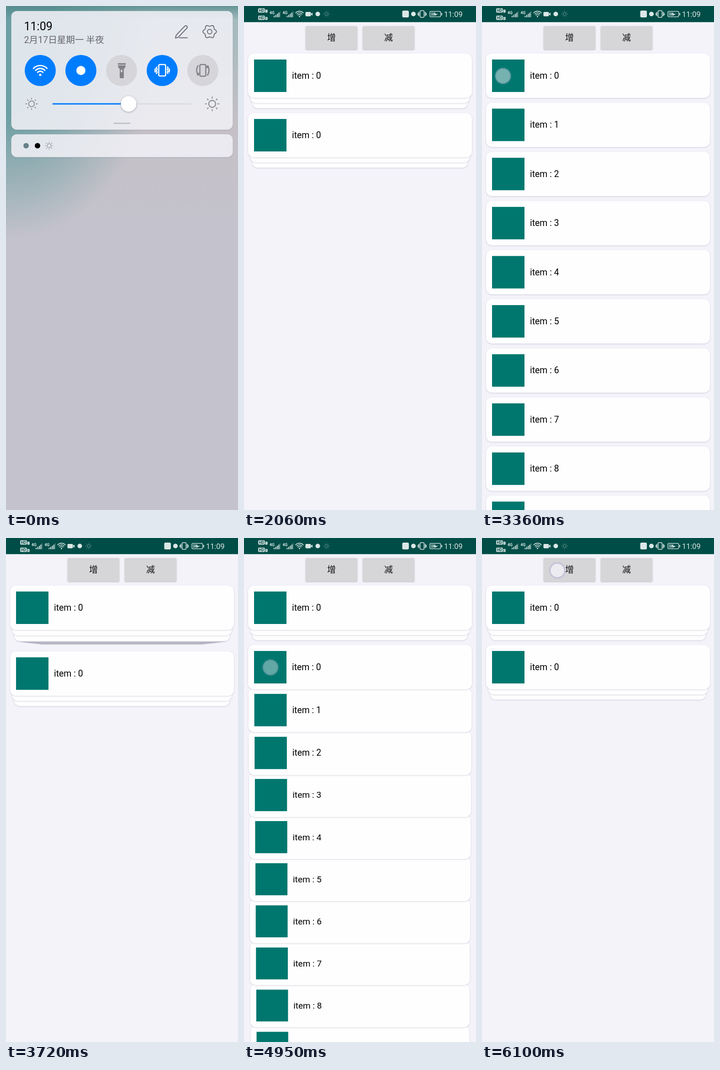
An HTML page that plays this animation: 508 px wide and 1102 px high, repeating every 6.14 s.

```html
<!DOCTYPE html>
<html lang="zh">
<head>
<meta charset="utf-8">
<style>
  html, body { margin: 0; width: 100%; height: 100%; overflow: hidden; }
  #stage {
    position: relative; width: 508px; height: 1102px; overflow: hidden; background: #f4f3fa;
    font-family: Roboto, "Noto Sans CJK SC", "Noto Sans CJK", sans-serif;
  }
  #stage > *, #list > *, .card > * { position: absolute; }
  svg { left: 0; top: 0; font-family: inherit; }
  .button {
    top: 43.5px; width: 113px; height: 51px; border-radius: 2px; background: #d6d5d8;
    box-shadow: 0 1px 3px rgba(0, 0, 0, .25); color: #111;
    font-size: 19px; font-weight: 500; line-height: 52px; text-align: center;
  }
  .card {
    left: 9px; top: 0; width: 490px; height: 97px; border-radius: 13px; background: #fefeff;
    box-shadow: 0 1px 3px rgba(50, 50, 90, .2); transform-origin: 50% 100%;
  }
  .icon { left: 13px; top: 13px; width: 71px; height: 71px; background: #00776e; }
  .label { left: 96px; top: 0; line-height: 98px; font-size: 19.4px; color: #000; white-space: pre; }
  #touch {
    left: -17px; top: -17px; width: 30px; height: 30px; border-radius: 50%;
    border: 2px solid rgba(180, 180, 212, .85); background: rgba(240, 239, 246, .82);
    box-shadow: 0 0 4px rgba(190, 190, 215, .6);
  }
  #shade {
    inset: 0;
    background:
      linear-gradient(#4d8484b0, #4d848400 30px),
      radial-gradient(ellipse 330px 420px at 0 90px, #6b9fa3 35%, #6b9fa300),
      linear-gradient(#9eb9bd, #c5c0c6 260px, #c4c2cc 470px);
  }
</style>
</head>
<body>
<div id="stage">
  <div class="button" style="left:135px">增</div>
  <div class="button" style="left:260px">减</div>
  <div id="list"></div>

  <svg width="508" height="36">
    <defs>
      <g id="sun" fill="none" stroke="currentColor" stroke-width="1.8" stroke-linecap="round">
        <circle r="6.3"/>
        <path d="M0-10.5V-12.5M0 10.5V12.5M-10.5 0H-12.5M10.5 0H12.5M-7.4-7.4-8.8-8.8M7.4 7.4 8.8 8.8M7.4-7.4 8.8-8.8M-7.4 7.4-8.8 8.8"/>
      </g>
      <g id="wifi" fill="none" stroke="currentColor" stroke-width="2.8" stroke-linecap="round">
        <circle r="2.6" fill="currentColor" stroke="none"/>
        <path d="M-5.8-5.5A8 8 0 0 1 5.8-5.5M-10.1-9.7A14 14 0 0 1 10.1-9.7M-14.8-14.1A20.5 20.5 0 0 1 14.8-14.1"/>
      </g>
      <g id="vibrate" fill="none" stroke="currentColor" stroke-width="2.6" stroke-linejoin="round">
        <rect x="-7.5" y="-12.5" width="15" height="25" rx="2.5"/>
        <path d="M-11-8-13-5-11-2-13 1-11 4-13 8M11-8 13-5 11-2 13 1 11 4 13 8M-15-4-16 0-15 5M15-4 16 0 15 5"/>
      </g>
      <g id="hd">
        <rect width="14.5" height="9.5" rx="2"/>
        <rect x="15.5" y="3" width="5" height="6.5" rx="1"/>
        <text x="7.2" y="7.8" font-size="8.5" font-weight="700" text-anchor="middle" fill="#004d47">HD</text>
      </g>
      <g id="signal">
        <text y="18" font-size="8.5" font-weight="700" textLength="auto">4G</text>
        <path d="M9 24.5v-3h2v3zM12.5 24.5v-5h2v5zM16 24.5v-7.5h2v7.5zM19.3 24.5v-10h2v10z"/>
        <path d="M22.3 24.5v-13h1.2v13z" opacity=".5"/>
      </g>
    </defs>
    <rect width="508" height="35.3" fill="#004d47"/>
    <g fill="#dbe7e6" color="#dbe7e6">
      <use href="#hd" x="31" y="5"/>
      <use href="#hd" x="31" y="21"/>
      <text x="48.5" y="13.2" font-size="6" fill="#004d47" text-anchor="middle">1</text>
      <text x="48.5" y="29.2" font-size="6" fill="#004d47" text-anchor="middle">2</text>
      <use href="#signal" x="56"/>
      <use href="#signal" x="84.5"/>
      <use href="#wifi" transform="translate(121.5 23) scale(.57)"/>
      <path d="M136.500 13h8q2 0 2 2v5.500q0 2-2 2h-8q-2 0-2-2v-5.500q0-2 2-2zM147 16.500l3-2v6.500l-3-2z"/>
      <circle cx="161.500" cy="17.500" r="5"/>
      <use href="#sun" transform="translate(181 17.500) scale(.53)" opacity=".55"/>
      <rect x="346.500" y="10" width="14.500" height="15" rx="3"/>
      <circle cx="371" cy="17.500" r="5"/>
      <use href="#vibrate" transform="translate(390 17.500) scale(.58)"/>
      <rect x="407" y="11.700" width="23.500" height="12" rx="2.500" fill="none" stroke="currentColor" stroke-width="1.300"/>
      <path d="M409 13.700h10v8h-10z" opacity=".45"/>
      <path d="M412 18.500l7-3.500v2.300h6l-7 4v-2.800zM432 15h1.800v5.500H432z"/>
      <text x="438" y="23.700" font-size="16.300">11:09</text>
    </g>
  </svg>

  <div id="touch"></div>
  <div id="shade"></div>

  <svg id="panel" width="508" height="340">
    <g fill="#f5f5fa" fill-opacity=".86" style="filter:drop-shadow(0 1px 1px rgba(60,60,80,.22))">
      <rect x="11.500" y="11" width="485" height="259.500" rx="12"/>
      <rect x="11.500" y="280.500" width="485" height="50" rx="12"/>
    </g>
    <text x="39.500" y="52.500" font-size="25">11:09</text>
    <text x="39.500" y="81" font-size="19.600" fill="#65656b">2月17日星期一 半夜</text>
    <g fill="none" stroke="#707076" stroke-width="2" stroke-linejoin="round" stroke-linecap="round">
      <path d="M371 70l1.500-6 19-20q2.500-2 4.500 0t0 4.500l-19 20zM380 69.500h17"/>
      <path id="gear"/>
      <circle cx="446" cy="56" r="5"/>
    </g>
    <g fill="#007dff">
      <circle cx="75" cy="141" r="34"/><circle cx="164" cy="141" r="34"/><circle cx="342" cy="141" r="34"/>
    </g>
    <g fill="#d6d5da">
      <circle cx="253" cy="141" r="34"/><circle cx="431" cy="141" r="34"/>
    </g>
    <g color="#fff">
      <use href="#wifi" x="75" y="150.500"/>
      <circle cx="164" cy="141" r="10" fill="#fff"/>
      <use href="#vibrate" x="342" y="140.500"/>
    </g>
    <path fill="#818187" d="M245 125h17v3.500h-17zM245 130h17q0 5-4 7.500v18q0 2.500-2.500 2.500h-4q-2.500 0-2.500-2.500v-18q-4-2.500-4-7.500z"/>
    <ellipse cx="253" cy="142" rx="2" ry="3" fill="#d6d5da"/>
    <g fill="none" stroke="#818187" stroke-width="2.500">
      <rect x="424.500" y="128" width="13" height="25.500" rx="2.500"/>
      <path d="M421 130q-7 10 0 22M441 130q7 10 0 22M418 150h3.500v-4M444 132h-3.500v4"/>
    </g>
    <g stroke-width="3" stroke-linecap="round">
      <path d="M103 214H405" stroke="#dcdbe1"/>
      <path d="M103 214H268" stroke="#007dff"/>
      <path d="M237 256.500H271" stroke="#c3c2c8"/>
    </g>
    <circle cx="268.500" cy="214" r="17" fill="#fff" style="filter:drop-shadow(0 1px 2px rgba(0,0,0,.3))"/>
    <g color="#88888d">
      <use href="#sun" x="56" y="214"/>
      <use href="#sun" transform="translate(451.500 214) scale(1.2)"/>
      <use href="#sun" transform="translate(94.500 305.500) scale(.68)"/>
    </g>
    <circle cx="44" cy="305.500" r="6" fill="#65818a"/>
    <circle cx="69" cy="305.500" r="6"/>
  </svg>
</div>

<script>
const LOOP = 6140, COUNT = 15, PITCH = 107.4, STACK_STEP = 11.3, TOP = 104;
const TOGGLE_MS = 275, FADE_MS = 120;
// Start of expanding and of collapsing, per group
const groupTimes = [[2272, 3462], [4275, 4882]];
// x, y, appears, gone
const taps = [
  [45, 153, 2060, 2400], [46, 153, 3050, 3432],
  [57, 283, 4040, 4400], [58, 283, 4670, 5010], [165, 71, 6000, 9000]
];

const byId = id => document.getElementById(id);
const clamp = v => Math.min(1, Math.max(0, v));
const smooth = v => (1 - Math.cos(Math.PI * clamp(v))) / 2;

byId('gear').setAttribute('d', 'M' + Array.from({ length: 48 }, (_, i) => {
  const angle = i / 48 * 2 * Math.PI;
  const radius = 13.2 + 1.7 * Math.cos(6 * angle);
  return [446 + radius * Math.cos(angle), 56 + radius * Math.sin(angle)].map(v => v.toFixed(1));
}).join('L') + 'Z');

const groups = groupTimes.map(() => {
  const cards = Array.from({ length: COUNT }, (_, i) => {
    const card = document.createElement('div');
    card.className = 'card';
    card.innerHTML = `<div class="icon"></div><div class="label">item : ${i}</div>`;
    return card;
  });
  byId('list').append(...[...cards].reverse());
  return cards;
});

function placeGroup(cards, top, open) {
  const folded = 1 - open;
  const slot = i => Math.min(i, 2) * STACK_STEP * folded + i * PITCH * open;
  cards.forEach((card, i) => {
    const lift = .5 * folded * Math.max(0, i - 2);
    const scale = 1 - 9 * i * folded / 490;
    card.style.transform = `translateY(${top + slot(i) - lift}px) scale(${scale})`;
    card.style.visibility = open === 0 && i > 2 ? 'hidden' : 'visible';
  });
  return top + slot(COUNT - 1) + PITCH;
}

function draw(t) {
  let top = TOP;
  groups.forEach((cards, g) => {
    const [expand, collapse] = groupTimes[g];
    const open = smooth((t - expand) / TOGGLE_MS) - smooth((t - collapse) / TOGGLE_MS);
    top = placeGroup(cards, top, open);
  });

  const tap = taps.find(([, , start, end]) => t >= start && t < end);
  const touch = byId('touch').style;
  touch.opacity = tap ? Math.min(clamp((t - tap[2]) / 80), clamp((tap[3] - t) / FADE_MS)) : 0;
  if (tap) touch.transform = `translate(${tap[0]}px, ${tap[1]}px)`;

  const closing = smooth((t - 20) / 340);
  byId('shade').style.opacity = 1 - closing;
  byId('panel').style.opacity = 1 - closing;
  byId('panel').style.transform = `translateY(${-340 * closing}px)`;
}

let began;
function tick(now) {
  began ??= now;
  draw((now - began) % LOOP);
  requestAnimationFrame(tick);
}
draw(0);
requestAnimationFrame(tick);
</script>
</body>
</html>
```
